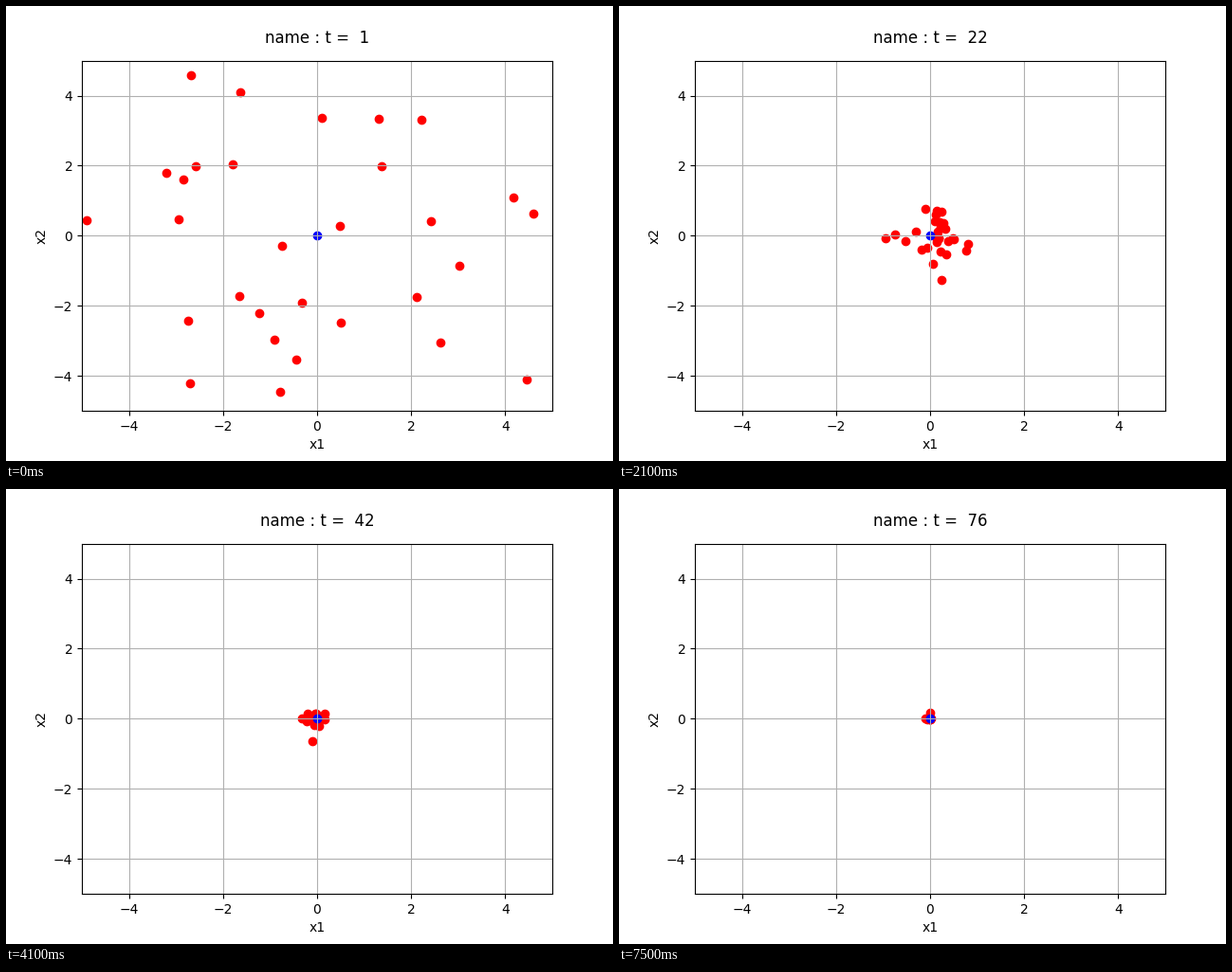
A matplotlib script for the animation above (7600 ms loop, 640 by 480 pixels).

```python
import numpy as np
import matplotlib.pyplot as plt
from matplotlib.animation import FuncAnimation

STEPS = 76

# Where the swarm is released, as (x1, x2).
START = np.array([
    (4.60, 0.62), (-0.79, -4.44), (-2.68, 4.58), (-1.63, 4.10), (0.10, 3.36),
    (1.31, 3.34), (2.22, 3.31), (-3.21, 1.79), (-2.84, 1.60), (-2.58, 1.98),
    (-1.79, 2.03), (1.37, 1.98), (-4.90, 0.44), (-2.94, 0.47), (-0.75, -0.30),
    (0.48, 0.28), (2.42, 0.41), (4.17, 1.09), (3.02, -0.86), (-1.65, -1.73),
    (-1.23, -2.21), (-0.32, -1.91), (-2.74, -2.43), (-0.91, -2.97),
    (0.50, -2.48), (2.12, -1.75), (2.62, -3.05), (-0.44, -3.54),
    (-2.70, -4.21), (4.46, -4.11),
])

# Each particle swings around the optimum and dies down at its own rate.
rng = np.random.default_rng(7)
period = rng.uniform(7, 15, START.shape)
decay = 9 + rng.exponential((4.5, 3.5), START.shape)


def positions(i):
    points = START * np.exp(-i / decay) * np.cos(2 * np.pi * i / period)
    # The whole swarm drifts left, then right, before it settles.
    points[:, 0] -= 1.2 * np.exp(-i / 15) * np.sin(2 * np.pi * i / 36)
    return points


fig, ax = plt.subplots(figsize=(6.4, 4.8), dpi=100)
ax.set(xlim=(-5, 5), ylim=(-5, 5), xlabel="x1", ylabel="x2")
ax.grid(True)
swarm = ax.scatter(*START.T, c="red")
ax.scatter(0, 0, c="blue")
title = ax.text(0.5, 1.05, "", transform=ax.transAxes, ha="center",
                fontsize=12)


def update(i):
    swarm.set_offsets(positions(i))
    title.set_text(f"name : t =  {i + 1}")
    return swarm, title


anim = FuncAnimation(fig, update, frames=STEPS, interval=100, repeat=True,
                     repeat_delay=0)
plt.show()
```
